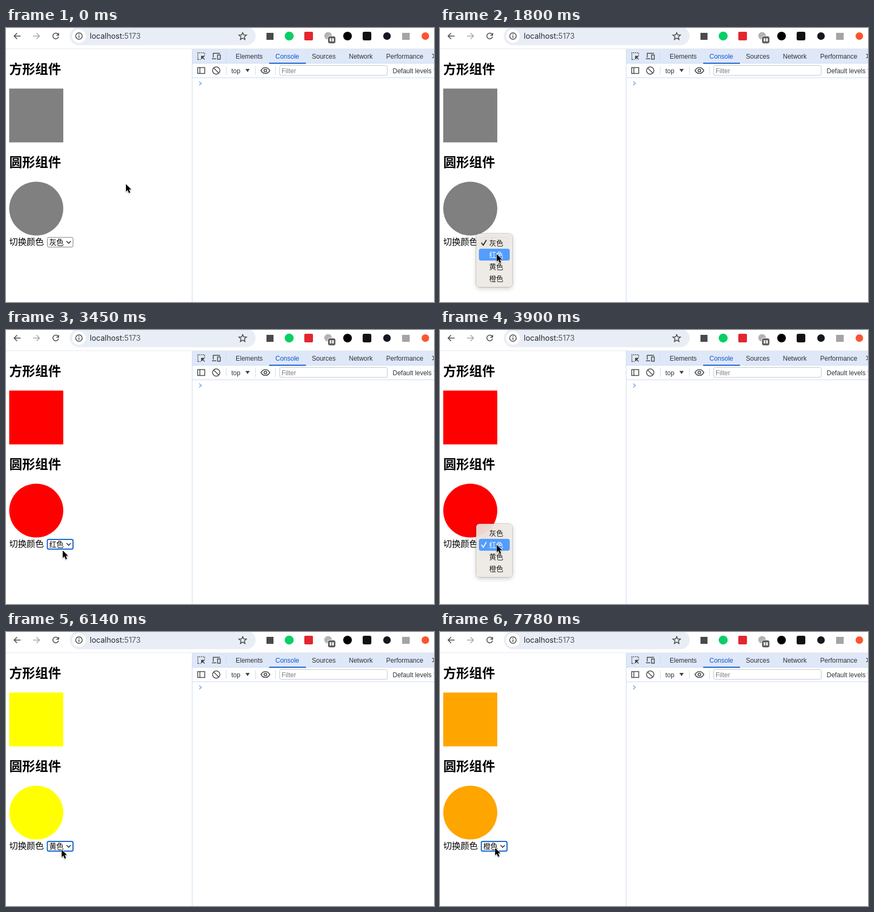
These frames come from a looping animation (792x509 px, 8000 ms). An HTML page:

```html
<!DOCTYPE html>
<html lang="zh">
<head>
<meta charset="utf-8">
<style>
html, body { margin: 0; width: 100%; height: 100%; overflow: hidden; background: #fff; }
svg.layer { position: absolute; left: 0; top: 0; width: 792px; height: 509px; }
text { white-space: pre; }
.cjk, #menu { font-family: "Noto Sans CJK SC", "Noto Sans CJK", sans-serif; }
.dev { font: 12px "Liberation Sans", Arial, sans-serif; fill: #303236; }
.url { font: 14px Inter, sans-serif; fill: #25282c; }
.line { fill: none; stroke: #474747; stroke-width: 1.5; }
.sep { stroke: #c9dbf6; }
#menu {
  position: absolute; left: 67px; width: 67px; height: 99px; box-sizing: border-box;
  padding: 6px 5px 5px; border-radius: 6px; font-size: 13px;
  background: rgba(236, 231, 226, .88); backdrop-filter: blur(14px);
  box-shadow: 0 0 0 .5px rgba(0, 0, 0, .3), 0 3px 9px rgba(0, 0, 0, .2);
}
.row { position: relative; height: 22px; line-height: 22px; padding-left: 19px; border-radius: 4px; color: #1c1b1a; }
.row.on { background: #529dfd; color: #fff; }
.row svg { position: absolute; left: 4px; top: 5px; fill: none; stroke: currentColor; stroke-width: 1.7; stroke-linecap: round; }
</style>
</head>
<body>
<svg class="layer" viewBox="0 0 792 509">
  <!-- browser bar -->
  <path d="M0 38.5H792" stroke="#e9e9ea"/>
  <rect x="118" y="-2" width="344" height="34" rx="17" fill="#e9eef6"/>
  <circle cx="135" cy="15" r="12.5" fill="#fff"/>
  <g class="line">
    <path d="M27 15H15.5M20.5 9.5 15 15l5.500 5.500"/>
    <path d="M50 15H61.500M56.500 9.500 62 15l-5.500 5.500" stroke="#a5a5a5"/>
    <path d="M96.800 12.500A5.300 5.300 0 1 0 97.200 16M97.400 9.200v4.300h-4.300"/>
    <circle cx="135" cy="15" r="6"/>
    <path d="M135 14v4.500M135 11v1.700"/>
    <path d="M438 8.500 439.900 12.800 445 13.200 441.100 16.500 442.300 21.500 438 18.900 433.700 21.500 434.900 16.500 431 13.200 436.100 12.800Z"/>
  </g>
  <text class="url" x="155" y="20">localhost:<tspan fill="#555a60">5173</tspan></text>
  <rect x="482" y="9" width="13" height="13" fill="#4a4a4a"/>
  <circle cx="524" cy="15" r="8.300" fill="#07cf66"/>
  <rect x="552" y="7" width="16" height="16" rx="2" fill="#e3262e"/>
  <circle cx="596" cy="14.500" r="7" fill="#b3b3b3"/>
  <rect x="595.500" y="15" width="14.500" height="14" rx="3.500" fill="#5c5c5c" stroke="#fff"/>
  <path d="M600.500 19v6M605 19v6" stroke="#fff" stroke-width="3"/>
  <circle cx="632" cy="15" r="8" fill="#000"/>
  <rect x="660" y="7" width="16" height="16" rx="3" fill="#111"/>
  <circle cx="705" cy="15" r="7" fill="#17181f"/>
  <rect x="733" y="9" width="14" height="13" fill="#a4a4a4"/>
  <circle cx="776" cy="15" r="7" fill="#f9562f"/>

  <!-- developer tools -->
  <rect x="345" y="39" width="447" height="27" fill="#dfe8f8"/>
  <path class="sep" d="M344.500 39V509M345 65.500H792M345 92.500H792M407.500 44V60M407.500 71V87M461.500 71V87M498.500 71V87"/>
  <path d="M487 65.500H555" stroke="#0b57d0" stroke-width="2"/>
  <g class="line">
    <path d="M355 58.500V46H367.500V51" stroke-dasharray="2 1.600"/>
    <path d="M355 58.500H360" stroke-dasharray="2 1.600"/>
    <path d="M367.500 58.500 362 53M361.800 58V52.500H367.500"/>
    <path d="M383.500 55V47H396M381 57.300H389"/>
    <rect x="391.500" y="50" width="5" height="8"/>
    <rect x="354.700" y="73.500" width="13" height="11"/>
    <path d="M358.700 73.500V84.500"/>
    <circle cx="389" cy="79" r="6.800"/>
    <path d="M384.300 74.300 393.700 83.700"/>
    <path d="M471.800 79Q475 73.500 480 73.500T488.200 79Q485 84.500 480 84.500T471.800 79Z"/>
    <circle cx="480" cy="79" r="2.500"/>
    <path d="M789 48l4 4-4 4"/>
  </g>
  <path d="M362 53h5l-5 5z" fill="#474747"/>
  <path d="M443 76h8l-4 6zM791 76h8l-4 6z" fill="#474747"/>
  <rect x="506.500" y="69.500" width="199" height="18.500" rx="3" fill="#fff" stroke="#c3c4c7"/>
  <g class="dev">
    <text x="425" y="56.500">Elements</text>
    <text x="498.500" y="56.500" fill="#0b57d0">Console</text>
    <text x="566" y="56.500">Sources</text>
    <text x="634.500" y="56.500">Network</text>
    <text x="703.500" y="56.500">Performance</text>
    <text x="417" y="83.500">top</text>
    <text x="510" y="83.500" fill="#7c7c7c">Filter</text>
    <text x="715.500" y="83.500">Default levels</text>
  </g>
  <path d="M357.500 99.500 361.500 103 357.500 106.500" fill="none" stroke="#6c9ff5" stroke-width="1.400"/>

  <!-- page -->
  <g class="cjk">
    <text x="6" y="85" font-size="24" font-weight="700">方形组件</text>
    <text x="6" y="258" font-size="24" font-weight="700">圆形组件</text>
    <g id="shapes">
      <rect x="6" y="112.500" width="100" height="100"/>
      <circle cx="56" cy="335.500" r="50"/>
    </g>
    <text x="6" y="402.500" font-size="16">切换颜色</text>
    <rect id="box" x="76.500" y="389" width="47.500" height="18" rx="2.500" fill="#fff"/>
    <text id="value" x="80" y="402.500" font-size="13.333"></text>
  </g>
  <path d="M112 396l4 4 4-4" fill="none" stroke="#111" stroke-width="1.300"/>
</svg>
<div id="menu"></div>
<svg class="layer" viewBox="0 0 792 509">
  <path id="cursor" d="M0 0V13.800L3.100 10.900 5.500 16.500 8 15.400 5.600 9.900H9.800Z" stroke="#fff" stroke-width="1.300" paint-order="stroke"
    style="filter: drop-shadow(0 1px 1px rgba(0,0,0,.35))"/>
</svg>
<script>
const LOOP = 8000, TICK = 150;
const names = ['灰色', '红色', '黄色', '橙色'];
const colors = ['gray', 'red', 'yellow', 'orange'];
// start time, ticks, destination
const moves = [
  [150, 5, 104, 396], [1500, 3, 105, 420], [3450, 2, 105, 399], [4350, 2, 103, 420],
  [5990, 3, 103, 399], [6730, 2, 103, 418], [7780, 1, 102, 401]
];
// each pick: menu opens, item blinks, fades, nearly gone, value changes
const picks = [
  [1050, 2400, 2550, 2700, 2850],
  [3900, 4950, 5100, 5240, 5390],
  [6440, 7030, 7180, 7330, 7480]
];
const $ = id => document.getElementById(id);
const [shapes, box, value, menu, cursor] = ['shapes', 'box', 'value', 'menu', 'cursor'].map($);

menu.innerHTML = names.map(n =>
  `<div class="row"><svg width="11" height="12"><path d="M1 6.5 4 10.500 9.500 1.500"/></svg>${n}</div>`).join('');
const rows = [...menu.children];

function cursorAt(t) {
  let x = 222, y = 290;
  for (const [start, ticks, toX, toY] of moves) {
    if (t < start) break;
    const p = Math.min(1, (Math.floor((t - start) / TICK) + 1) / ticks);
    const e = p * p * (3 - 2 * p);
    x += (toX - x) * e;
    y += (toY - y) * e;
  }
  return [x, y];
}

function draw(t) {
  const [x, y] = cursorAt(t);
  cursor.setAttribute('transform', `translate(${x} ${y})`);

  const chosen = picks.filter(p => t >= p[4]).length;
  const pick = picks.find(p => t >= p[0] && t < p[4]);
  const focused = chosen > 0 && !pick;
  shapes.setAttribute('fill', colors[chosen]);
  value.textContent = names[chosen];
  box.setAttribute('stroke', focused ? '#0f62cf' : t >= 750 ? '#2b2b2b' : '#767676');
  box.setAttribute('stroke-width', focused ? 2 : 1);

  menu.style.display = pick ? '' : 'none';
  if (!pick) return;
  const top = 382 - 22 * chosen;
  const blink = t >= pick[1] && t < pick[2];
  const hover = blink ? -1 : Math.floor((y - top - 6) / 22);
  menu.style.top = top + 'px';
  menu.style.opacity = t < pick[2] ? 1 : t < pick[3] ? .5 : .04;
  rows.forEach((row, i) => {
    row.classList.toggle('on', i === Math.max(hover, blink ? -1 : 0));
    row.firstChild.style.display = i === chosen ? '' : 'none';
  });
}

function frame() {
  draw(performance.now() % LOOP);
  requestAnimationFrame(frame);
}
frame();
</script>
</body>
</html>
```
